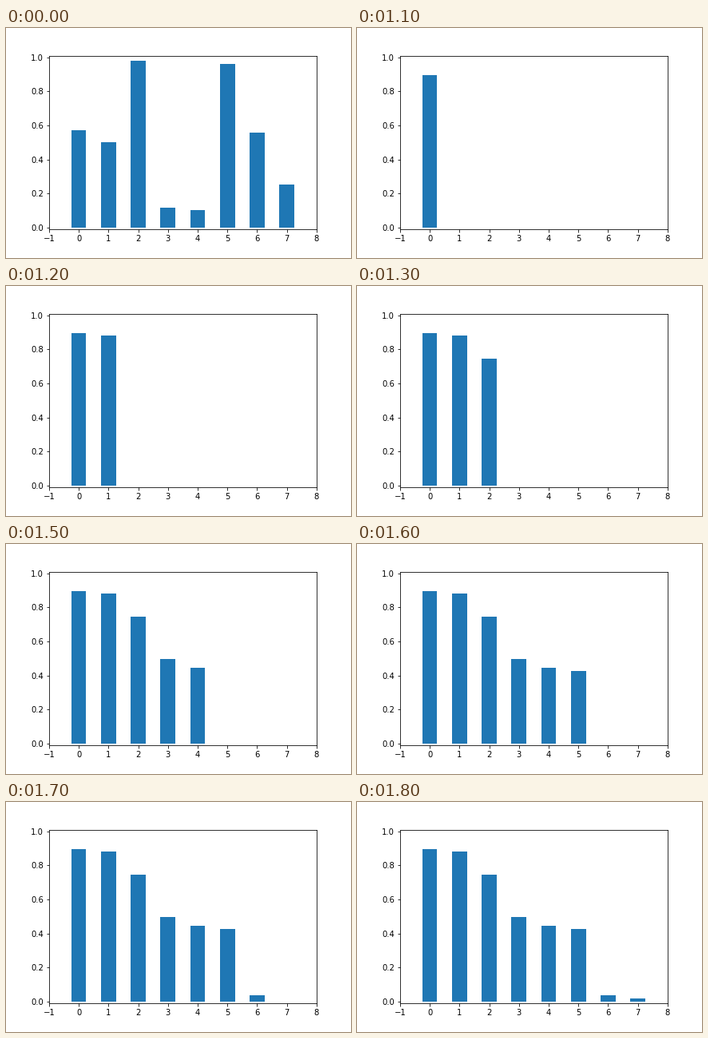
Recreate the animation shown at these times as a matplotlib script. Size 432 by 288 pixels, loop 2900 ms.

```python
import matplotlib.pyplot as plt
from matplotlib.animation import FuncAnimation

STEP = 100   # ms per frame
HOLD = 11    # frames a full chart stays on screen

# The chart's data: one height per bar
mixed = [0.572, 0.501, 0.98, 0.117, 0.103, 0.961, 0.557, 0.253]
ranked = [0.895, 0.881, 0.745, 0.497, 0.445, 0.426, 0.037, 0.018]
count = len(mixed)

fig, ax = plt.subplots(figsize=(6, 4), dpi=72)
fig.subplots_adjust(left=0.125, right=0.9, bottom=0.125, top=0.88)
ax.set(xlim=(-1, count), ylim=(-0.01, 1.01))
bars = ax.bar(range(count), mixed, width=0.5, color="tab:blue",
              align="center")


def update(frame):
    """Hold the mixed bars, then reveal the ranked ones one by one."""
    heights = mixed if frame < HOLD else ranked
    shown = count if frame < HOLD else frame - HOLD + 1
    for i, (bar, height) in enumerate(zip(bars, heights)):
        bar.set_height(height)
        bar.set_visible(i < shown)
    return list(bars)


# Hold, reveal (its last step starts the second hold), hold
anim = FuncAnimation(fig, update, frames=2 * HOLD + count - 1, interval=STEP,
                     init_func=lambda: update(0), repeat=True,
                     repeat_delay=0)
plt.show()
```
